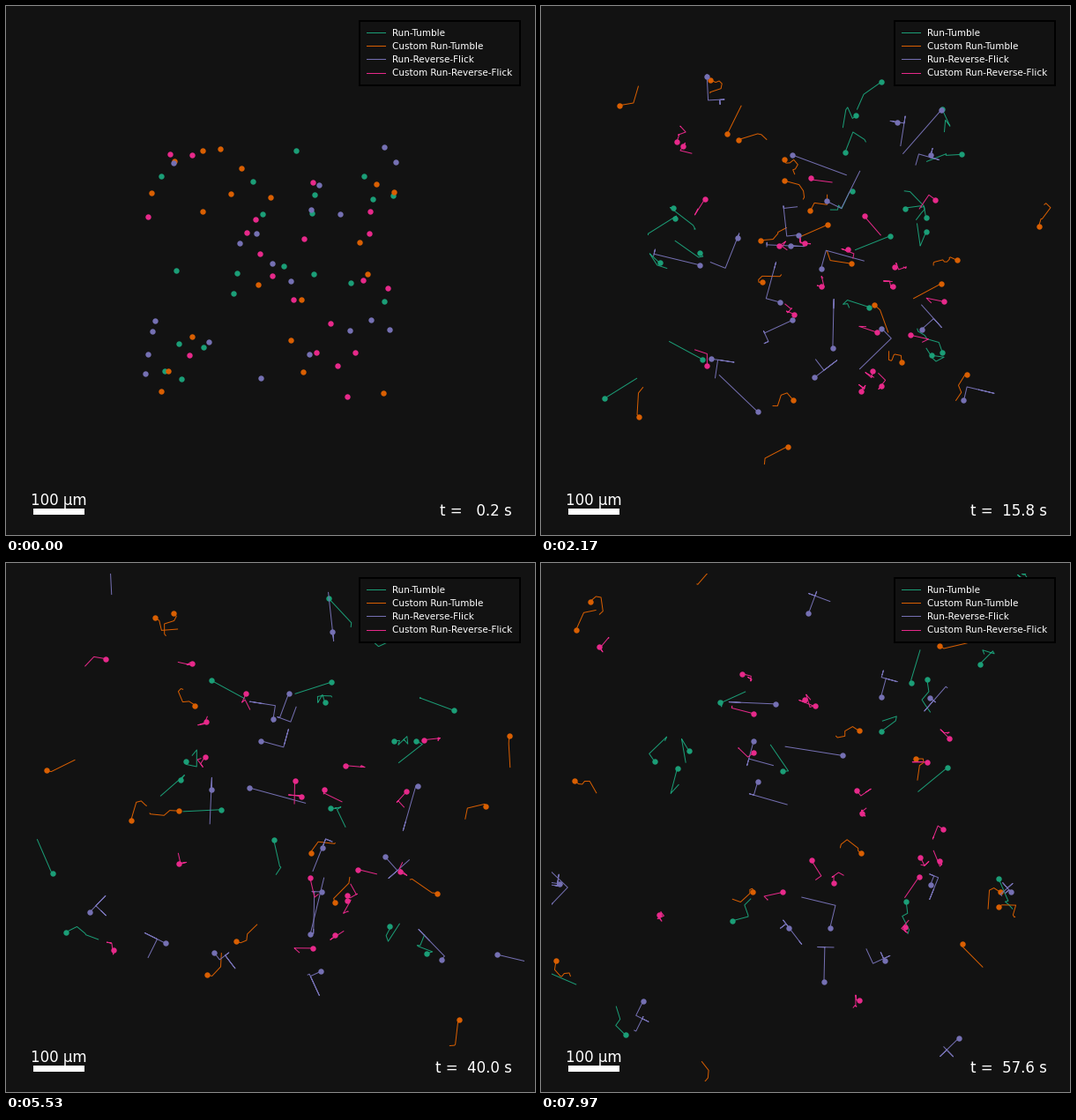
Animation, 600 px wide and 600 px high, one loop 8 s. Source, as a matplotlib script:

```python
import numpy as np
import matplotlib.pyplot as plt
from matplotlib.animation import FuncAnimation
from matplotlib.collections import LineCollection
from matplotlib.lines import Line2D
from matplotlib.patches import Rectangle

SIZE, DPI, MARGIN = 600, 100, 12
PT = 72 / DPI                # points per pixel
UM = 0.576                   # pixels per micrometre
STATES, LOOP, TICK = 288, 8000, 20
DT, SUBSTEPS, TRAIL = 0.1, 2, 25
COUNT, SPREAD = 20, 250      # microbes per species, half side of start box in um

BACK = "#121212"
rng = np.random.default_rng(11)


def sign(n):
    return rng.choice([-1, 1], n)


# Turning rules: each returns one angle per microbe; k counts its past turns.
def tumble(k):
    return rng.uniform(-np.pi, np.pi, k.size)


def soft_tumble(k):
    # Three turns to one side, then three to the other, give hooks and S-bends.
    side = 1 - 2 * (k // 3 % 2)
    return side * rng.normal(0.95, 0.3, k.size)


def reverse_flick(k):
    return np.where(k % 2, sign(k.size) * np.pi / 2, np.pi)


def noisy_reverse_flick(k):
    return reverse_flick(k) + rng.normal(0, 0.3, k.size)


def walk(speed, rate, turn):
    """Positions in pixels, shaped (steps, microbes, 2)."""
    path = [SIZE / 2 + UM * rng.uniform(-SPREAD, SPREAD, (COUNT, 2))]
    heading = rng.uniform(0, 2 * np.pi, COUNT)
    turns = rng.integers(0, 6, COUNT)
    for _ in range(STATES * SUBSTEPS):
        hit = rng.random(COUNT) < rate * DT
        heading = heading + np.where(hit, turn(turns), 0)
        turns = turns + hit
        step = np.column_stack([np.cos(heading), np.sin(heading)])
        path.append(path[-1] + speed * DT * UM * step)
    return np.array(path)


# label, colour, speed in um/s, turns per second, turning rule
SPECIES = [
    ("Run-Tumble", "#1b9e77", 30, 0.9, tumble),
    ("Custom Run-Tumble", "#d95f02", 25, 1.2, soft_tumble),
    ("Run-Reverse-Flick", "#7570b3", 46, 1.0, reverse_flick),
    ("Custom Run-Reverse-Flick", "#e7298a", 20, 1.0, noisy_reverse_flick),
]

plt.rcParams["font.family"] = "DejaVu Sans"
fig = plt.figure(figsize=(SIZE / DPI, SIZE / DPI), dpi=DPI, facecolor=BACK)
edge = MARGIN / SIZE
ax = fig.add_axes([edge, edge, 1 - 2 * edge, 1 - 2 * edge])
ax.set_xlim(MARGIN, SIZE - MARGIN)
ax.set_ylim(SIZE - MARGIN, MARGIN)
ax.axis("off")

# Microbes
swarms, keys = [], []
for i, (label, color, speed, rate, turn) in enumerate(SPECIES):
    trails = LineCollection([], colors=color, linewidths=PT, zorder=2 + i)
    ax.add_collection(trails, autolim=False)
    dots, = ax.plot([], [], "o", color=color, ms=6.4 * PT, mew=0,
                    zorder=2.5 + i)
    swarms.append((walk(speed, rate, turn), trails, dots))
    keys.append(Line2D([], [], color=color, lw=PT, label=label))

legend = ax.legend(handles=keys, loc="upper right", fontsize=7.5,
                   borderpad=0.8, fancybox=False, framealpha=1,
                   facecolor=BACK, edgecolor="black", labelcolor="white")
legend.get_frame().set_linewidth(2 * PT)
legend.set_zorder(10)


def caption(x, y, text, ha):
    return ax.text(x, y, text, color="white", fontsize=12, ha=ha,
                   va="baseline", zorder=11)


# Scale bar and clock
ax.add_patch(Rectangle((31, 570), 58, 7, facecolor="white", lw=0, zorder=10))
caption(60, 566, "100 μm", "center")
clock = caption(573.6, 578, "", "right")


def update(frame):
    # The offset keeps state changes centred on the ticks.
    state = int((frame * TICK + 13) * STATES / LOOP)
    now = state * SUBSTEPS
    for path, trails, dots in swarms:
        recent = path[max(0, now - TRAIL):now + 1]
        trails.set_segments(list(recent.transpose(1, 0, 2)))
        dots.set_data(path[now, :, 0], path[now, :, 1])
    clock.set_text(f"t = {(state + 1) * DT * SUBSTEPS:5.1f} s")
    return []


anim = FuncAnimation(fig, update, frames=LOOP // TICK, interval=TICK,
                     init_func=lambda: update(0), repeat=True, repeat_delay=0)
plt.show()
```
